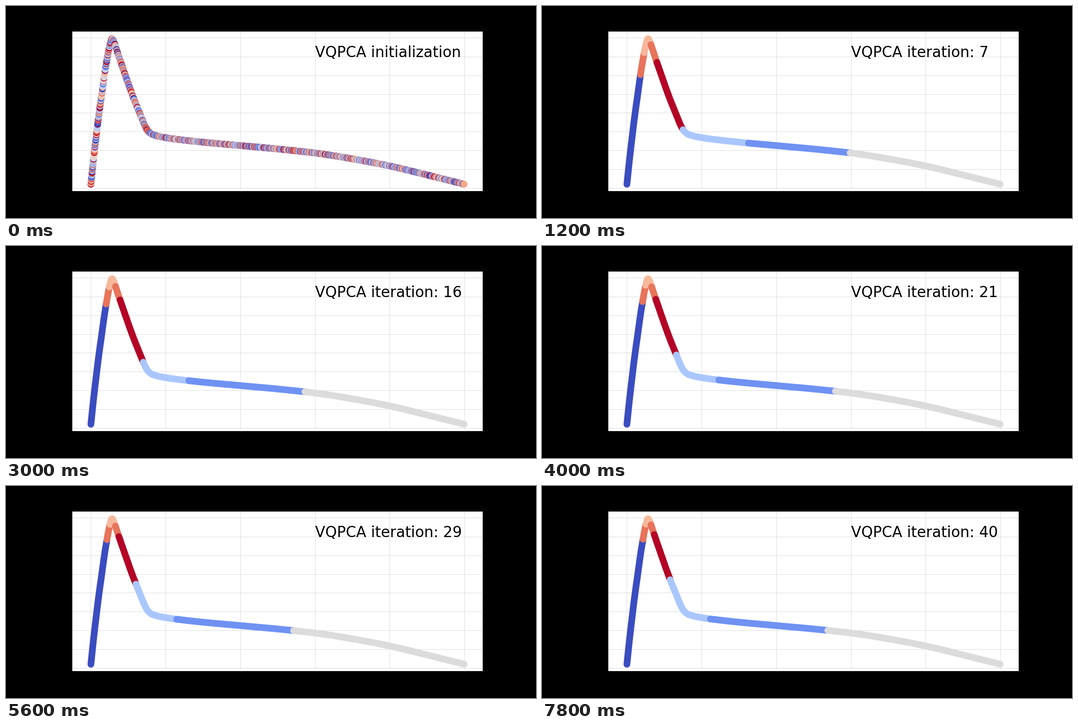
Recreate the animation shown at these times as a matplotlib script. Size 1183x473 px, loop 8000 ms.

```python
import numpy as np
import matplotlib.pyplot as plt
from matplotlib.animation import FuncAnimation
from matplotlib.patches import Rectangle

W, H, DPI = 1183, 473, 100
FRAMES, INTERVAL = 40, 200
DOT = 15 * 72 / DPI  # marker diameter and band width in points
CMAP = plt.get_cmap("coolwarm")


def spline(keys, vals, t):
    """Cubic Hermite curve through (keys, vals) with averaged slopes."""
    keys, vals = np.asarray(keys, float), np.asarray(vals, float)
    h = np.diff(keys)
    d = np.diff(vals) / h
    m = np.r_[d[0], (d[:-1] * h[1:] + d[1:] * h[:-1]) / (h[1:] + h[:-1]), d[-1]]
    i = np.clip(np.searchsorted(keys, t, side="right") - 1, 0, len(h) - 1)
    u = (t - keys[i]) / h[i]
    return ((1 + 2 * u) * (1 - u) ** 2 * vals[i] + u * (1 - u) ** 2 * h[i] * m[i]
            + u * u * (3 - 2 * u) * vals[i + 1] + u * u * (u - 1) * h[i] * m[i + 1])


# Centre line of the curve, in pixels
KNOTS = np.array([
    (189.5, 397.7), (194, 354), (200, 302), (207, 245), (214, 195),
    (222, 139), (225.5, 119), (229.5, 97), (232, 86), (237, 73),
    (241.3, 81), (244.4, 90), (251.7, 112), (260, 136), (273, 173.5),
    (287.3, 212), (300, 243), (312, 271), (317, 279), (324, 285),
    (338, 290), (356, 293.7), (395, 299), (431, 303), (507, 310),
    (575, 316), (650, 323.5), (690, 328), (770, 340.5), (856, 356.8),
    (940, 377), (1022.8, 397.7)])
chord = np.r_[0, np.cumsum(np.hypot(*np.diff(KNOTS, axis=0).T))]
S = np.linspace(0, chord[-1], 4000)
X, Y = spline(chord, KNOTS[:, 0], S), spline(chord, KNOTS[:, 1], S)
PEAK = int(np.argmin(Y))
INDEX = np.arange(len(S))

# Cluster borders over time: (where it is measured, positions at KEYS)
KEYS = [1, 2, 6, 10, 20, 28, 34, 39]
BORDERS = [
    ("rise", [203, 195, 153, 139, 124, 119.5, 118.5, 118.5]),
    ("rise", [123, 119, 104, 97, 87.5, 85.5, 85, 85]),
    ("fall", [79.5, 81, 86.5, 88.5, 91, 89.5, 88, 87]),
    ("fall", [139, 136, 126, 122.5, 119, 113, 110, 108.5]),
    ("fall", [281, 279, 276, 272, 243, 219, 212, 209.5]),
    ("flat", [525, 507, 461, 431, 395, 381, 378, 376]),
    ("flat", [630, 650, 688, 680, 655, 642, 640, 638]),
]
CLUSTERS = [0, 5, 4, 5, 6, 2, 1, 3]


def locate(part, v):
    """Index on the curve for a height on a flank or an x on the tail."""
    if part == "rise":
        return int(np.interp(-v, -Y[:PEAK], INDEX[:PEAK]))
    if part == "fall":
        return int(np.interp(v, Y[PEAK:], INDEX[PEAK:]))
    return int(np.interp(v, X, INDEX))


fig = plt.figure(figsize=(W / DPI, H / DPI), dpi=DPI, facecolor="black")
ax = fig.add_axes([0, 0, 1, 1])
ax.set_xlim(0, W)
ax.set_ylim(H, 0)
ax.axis("off")

LEFT, TOP, RIGHT, BOTTOM = 148, 57, 1064, 413
ax.add_patch(Rectangle((LEFT, TOP), RIGHT - LEFT, BOTTOM - TOP, fc="white", lw=0, zorder=0))
grid = dict(color="#dcdcdc", lw=0.72, zorder=1, solid_capstyle="butt")
for k in range(6):
    x = 189.5 + 166.68 * k
    ax.plot([x, x], [TOP, BOTTOM], **grid)
for k in range(9):
    y = 71 + 41.87 * k
    ax.plot([LEFT, RIGHT], [y, y], **grid)

# Randomly labelled samples
rng = np.random.default_rng(7)
step = np.interp(X, [189, 225, 240, 310, 330, 1023], [2.2, 1.8, 1.2, 1.1, 0.8, 0.8])
count = np.cumsum(np.gradient(S) / step)
pick = np.linspace(count[0], count[-1], int(count[-1]))
labels = rng.integers(0, 8, len(pick))
labels[-1] = 5
dots = ax.scatter(np.interp(pick, count, X), np.interp(pick, count, Y), s=DOT ** 2,
                  c=CMAP(labels / 7), linewidths=0, zorder=2)

bands = [ax.plot([], [], color=CMAP(c / 6), lw=DOT, solid_capstyle="round",
                 solid_joinstyle="round", zorder=3 + i * 0.1)[0]
         for i, c in enumerate(CLUSTERS)]
title = ax.text(689.6, 114, "", family="DejaVu Sans", size=23.8, color="black",
                va="baseline", ha="left", zorder=6)


def draw(frame):
    start = frame == 0
    dots.set_visible(start)
    title.set_text("VQPCA initialization" if start else f"VQPCA iteration: {frame + 1}")
    cuts = [0]
    if not start:
        cuts += [locate(part, spline(KEYS, vals, frame)) for part, vals in BORDERS]
    cuts.append(len(S) - 1)
    for i, band in enumerate(bands):
        band.set_visible(not start)
        if not start:
            part = slice(cuts[i], cuts[i + 1] + 1)
            band.set_data(X[part], Y[part])
    return [dots, title, *bands]


anim = FuncAnimation(fig, draw, frames=FRAMES, interval=INTERVAL, repeat=True,
                     repeat_delay=0, init_func=lambda: draw(0), blit=False)
plt.show()
```
